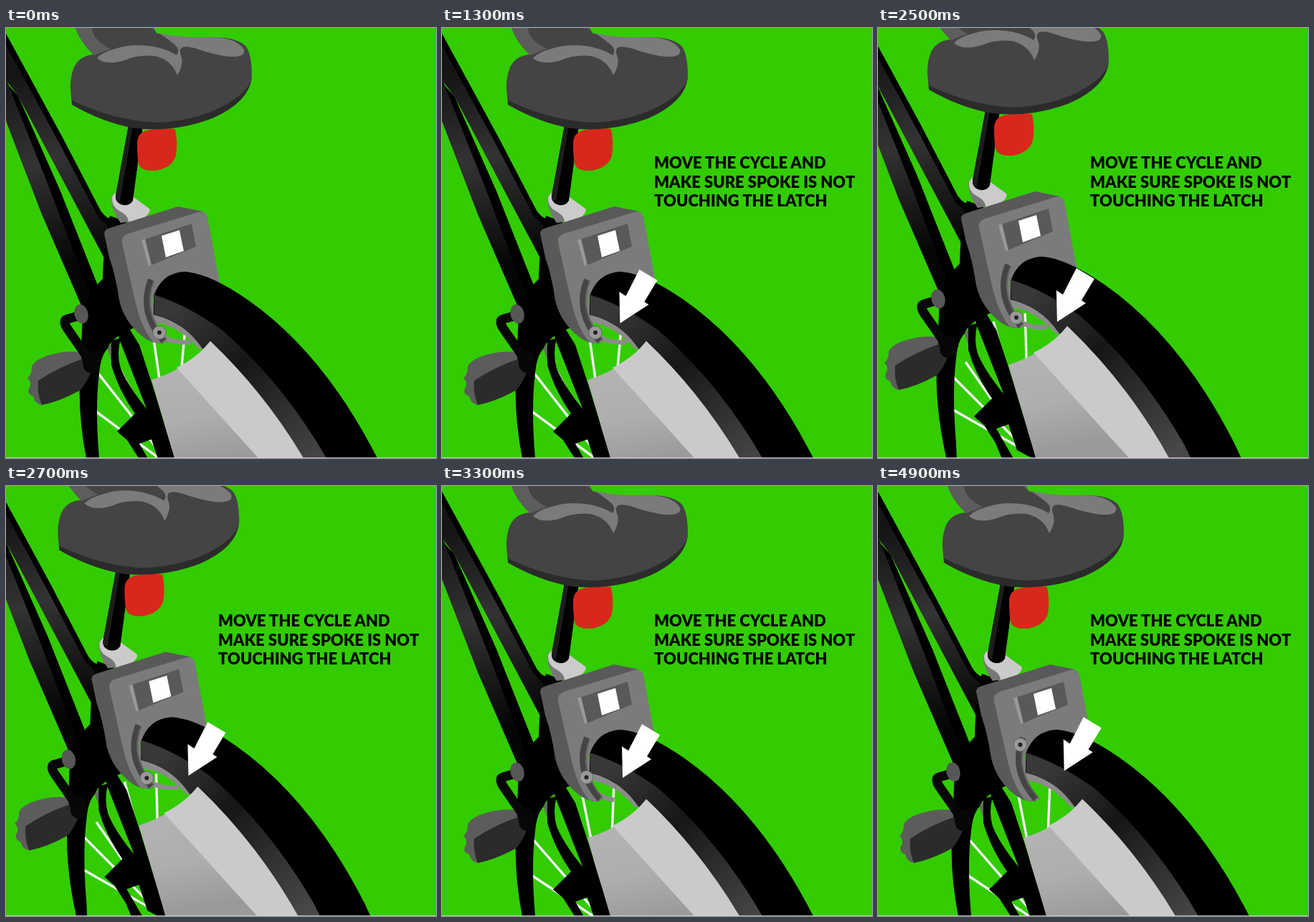
An HTML page that plays this animation: 600 by 600 pixels, repeating every 5 s.

```html
<!DOCTYPE html>
<html lang="en">
<head>
<meta charset="utf-8">
<title>Unlocking the cycle</title>
<style>
html, body { margin: 0; width: 100%; height: 100%; overflow: hidden; background: #3c0; }
svg { display: block; width: 100vw; height: 100vh; }
text { font: 900 22px Lato, "Open Sans", sans-serif; }
</style>
</head>
<body>
<svg viewBox="0 0 600 600">
  <defs>
    <linearGradient id="tube" gradientUnits="userSpaceOnUse" x1="20" y1="60" x2="110" y2="330">
      <stop offset="0" stop-color="#151515"/><stop offset=".45" stop-color="#333"/><stop offset="1" stop-color="#050505"/>
    </linearGradient>
    <linearGradient id="wall" gradientUnits="userSpaceOnUse" x1="240" y1="390" x2="440" y2="610">
      <stop offset="0" stop-color="#383838"/><stop offset=".4" stop-color="#161616"/><stop offset=".7" stop-color="#303030"/><stop offset="1" stop-color="#484848"/>
    </linearGradient>
    <linearGradient id="guard" gradientUnits="userSpaceOnUse" x1="240" y1="480" x2="265" y2="610">
      <stop offset="0" stop-color="#b3b3b3"/><stop offset=".5" stop-color="#aeaeae"/><stop offset="1" stop-color="#9a9a9a"/>
    </linearGradient>
  </defs>
  <rect width="600" height="600" fill="#3c0"/>

  <g id="bike">
    <g id="spokes" stroke="#f4f4f4" stroke-width="3.4"></g>

    <!-- frame tubes -->
    <path fill="url(#tube)" d="M-25 -40L0 8L80 155L132 255Q140 266 146 266L150 345L136 319L17 95L-10 60Z"/>
    <path d="M-25 -40L0 8L80 155L132 255Q140 266 146 266L146 280L128 262L74 160L0 24Z"/>
    <path fill="url(#tube)" d="M-25 20L5 82L17 95L76 228L128 362L108 394L50 260L0 130L-25 68Z"/>
    <path d="M4 81L17 95L76 228L130 364L122 384L60 222Z"/>

    <!-- bottom bracket and fork -->
    <path d="M145 262L168 270L172 400L184 416Q146 432 142 447Q132 457 130 482Q124 530 130 600L131 625L117 625L112 600Q99 535 104 470L107 396Q114 370 135 350Q136 300 145 262Z"/>
    <path fill="#666" d="M142 448Q146 438 160 432L154 452L157 486L149 470Z"/>

    <!-- stays -->
    <path d="M140 318L160 400L186 442Q195 470 205 500L243 625L226 607L158 434Z"/>
    <path d="M147 436L160 433Q154 455 160 475Q172 505 212 550L235 600L243 625L215 610L203 574L186 580L212 625L194 622L185 600L169 575L155 563L180 538Q157 505 147 470Z"/>

    <!-- crank and pedal -->
    <path fill="#5c5c5c" d="M30 488Q36 484 36 472Q41 462 62 456Q88 449 104 453L110 490L50 526Q40 524 38 514Q29 511 32 503Q37 496 30 488Z"/>
    <path fill="#2b2b2b" d="M45 492Q75 472 109 461L118 481Q113 494 104 505Q76 521 50 526Q43 510 45 492Z"/>
    <g fill="none" stroke="#070707" stroke-linecap="round" stroke-linejoin="round">
      <path stroke-width="13" d="M100 402L86 406Q78 408 86 420L116 463"/>
      <path stroke-width="23" d="M118 462L119 470"/>
    </g>
    <ellipse cx="105" cy="399" rx="9.5" ry="13.5" fill="#575757" transform="rotate(-14 105 399)"/>

    <!-- seat post -->
    <path fill="#777" d="M147 237Q150 230 155 229L172 270L160 272Q147 255 147 237Z"/>
    <path fill="#cbcbcb" d="M148 236Q151 230 155 229L178 236L200 252Q203 256 194 264L171 272Q172 262 158 255Q147 249 148 236Z"/>
    <path d="M171 136L191 136L177 241Q171 250 160 246Q152 242 153 234Z"/>
    <path fill="#1d1d1d" d="M171 136L177 136L159 241Q152 241 153 234Z"/>
    <path fill="#d8281b" d="M183 161Q183 147 196 143Q218 138 236 141Q240 160 237 178Q232 195 209 199Q190 200 186 192Q183 184 183 161Z"/>

    <!-- saddle -->
    <path fill="#2b2b2b" d="M91 94L92 107Q135 132 180 140Q236 146 288 126Q340 103 343 68Z"/>
    <path fill="#444" d="M97 -30L97 0Q104 20 122 37Q101 39 94 57Q87 77 92 101Q150 129 210 132Q270 129 310 105Q342 86 343 66Q343 38 335 26Q322 11 277 13Q229 14 210 7L190 -30Z"/>
    <path fill="#5d5d5d" d="M85 -30L97 0Q104 20 123 38L146 29Q121 17 120 0L105 -30Z"/>
    <path fill="#7b7b7b" d="M127 42Q135 33 156 28Q178 21 207 26Q228 31 238 38Q244 30 234 22Q223 13 200 -2L205 2Q219 13 277 13Q320 11 332 30Q335 41 312 40Q292 38 263 28Q238 21 244 38Q249 50 239 66Q231 44 207 39Q184 37 166 45Q139 53 127 42Z"/>

    <!-- lock housing -->
    <path fill="#595959" d="M137 287Q137 281 145 279L240 249L275 256L170 310L220 440Q203 441 190 430Q165 410 158 380Q153 345 144 320Z"/>
    <path fill="#7b7b7b" d="M162 300Q160 291 170 287L268 257Q278 254 281 263L300 365L205 375L207 402Q213 425 226 437Q216 442 205 438Q188 417 180 380Z"/>
    <path fill="#595959" d="M190 296L259 273L265 305L200 332Z"/>
    <path fill="#999" d="M189 296L194 294L203 331L199 332Z"/>
    <path fill="#fff" d="M217 290L242 282L248 311L223 320Z"/>

    <!-- rear wheel -->
    <path fill="#8b8b8b" d="M206 399Q238 400 278 444L270 449Q244 417 209 411Z"/>
    <path d="M206 374Q217 342 248 340Q282 341 337 379Q443 453 518 600L531 628L455 628L275 445Q246 409 206 400Z"/>
    <path fill="url(#wall)" d="M206 372Q254 387 302 422Q385 493 447 600L461 628L430 628L273 446Q247 409 207 400Z"/>
    <path fill="url(#guard)" d="M203 491Q255 475 285 437Q360 508 415 600L431 628L243 628L235 600Z"/>
    <path fill="#cacaca" d="M238 474Q267 460 285 437Q360 508 415 600L431 628L378 628L352 600Z"/>

    <!-- latch -->
    <path id="ring" pathLength="1" fill="none" stroke="#8b8b8b" stroke-width="6.5" d="M212 425Q228 441 258 438"/>
    <path fill="none" stroke="#444" stroke-width="8" d="M202 351Q184 396 220 437"/>
    <path fill="none" stroke="#5d5d5d" stroke-width="2" d="M206 353Q189 396 224 435"/>
    <g id="knob">
      <circle r="9.2" fill="#999" stroke="#666"/>
      <circle r="3" fill="#222"/>
    </g>
  </g>

  <path id="arrow" fill="#fff" d="M0 0L-1 -44L8 -38L27 -75L52 -60L34 -30L40 -26Z"/>
  <g id="label">
    <text x="296" y="195.5">MOVE THE CYCLE AND</text>
    <text x="296" y="222.5">MAKE SURE SPOKE IS NOT</text>
    <text x="296" y="249">TOUCHING THE LATCH</text>
  </g>
  <rect y="599.3" width="600" height="1" fill="#ddd"/>
</svg>
<script>
const LOOP = 5000;
const HUB = { x: 232, y: 614 };
const SPOKES = [[-8.2, 190], [5.3, 195], [-28, 155], [-38, 178], [-53.5, 140]];
const el = id => document.getElementById(id);
const ramp = (t, a, b) => Math.min(1, Math.max(0, (t - a) / (b - a)));
const ease = u => u * u * (3 - 2 * u);
const bezier = (u, a, b, c) => (1 - u) ** 2 * a + 2 * u * (1 - u) * b + u * u * c;
const move = (id, x, y) => el(id).setAttribute("transform", `translate(${x} ${y})`);

el("spokes").innerHTML = SPOKES.map(([angle, length]) => {
  const a = angle * Math.PI / 180;
  return `<line x1="${HUB.x}" y1="${HUB.y}" x2="${HUB.x + length * Math.sin(a)}" y2="${HUB.y - length * Math.cos(a)}"/>`;
}).join("");

function draw(t) {
  // The cycle rolls back and returns along a parabola in time.
  const roll = Math.max(0, 1 - ((t - 2500) / 500) ** 2);
  move("bike", -21 * roll, -21 * roll);
  const turn = -3 * ramp(t, 2000, 3000) - 5.5 * roll;
  el("spokes").setAttribute("transform", `rotate(${turn} ${HUB.x} ${HUB.y})`);

  const open = ease(ramp(t, 3100, 3600));
  move("knob", bezier(open, 214, 191, 198.5), bezier(open, 425, 402, 361));
  el("ring").setAttribute("stroke-dasharray", `${1 - open} 2`);
  el("ring").setAttribute("visibility", open < 1 ? "visible" : "hidden");

  const swing = (1 - Math.cos((t - 2565) / 635 * 2 * Math.PI)) / 2;
  move("arrow", 248.4 + 15.8 * swing, 412 - 20.2 * swing);
  el("arrow").setAttribute("opacity", ramp(t, 1000, 1200));
  el("label").setAttribute("opacity", ramp(t, 50, 550));
}

const start = performance.now();
function tick() {
  draw((performance.now() - start) % LOOP);
  requestAnimationFrame(tick);
}
draw(0);
requestAnimationFrame(tick);
</script>
</body>
</html>
```
